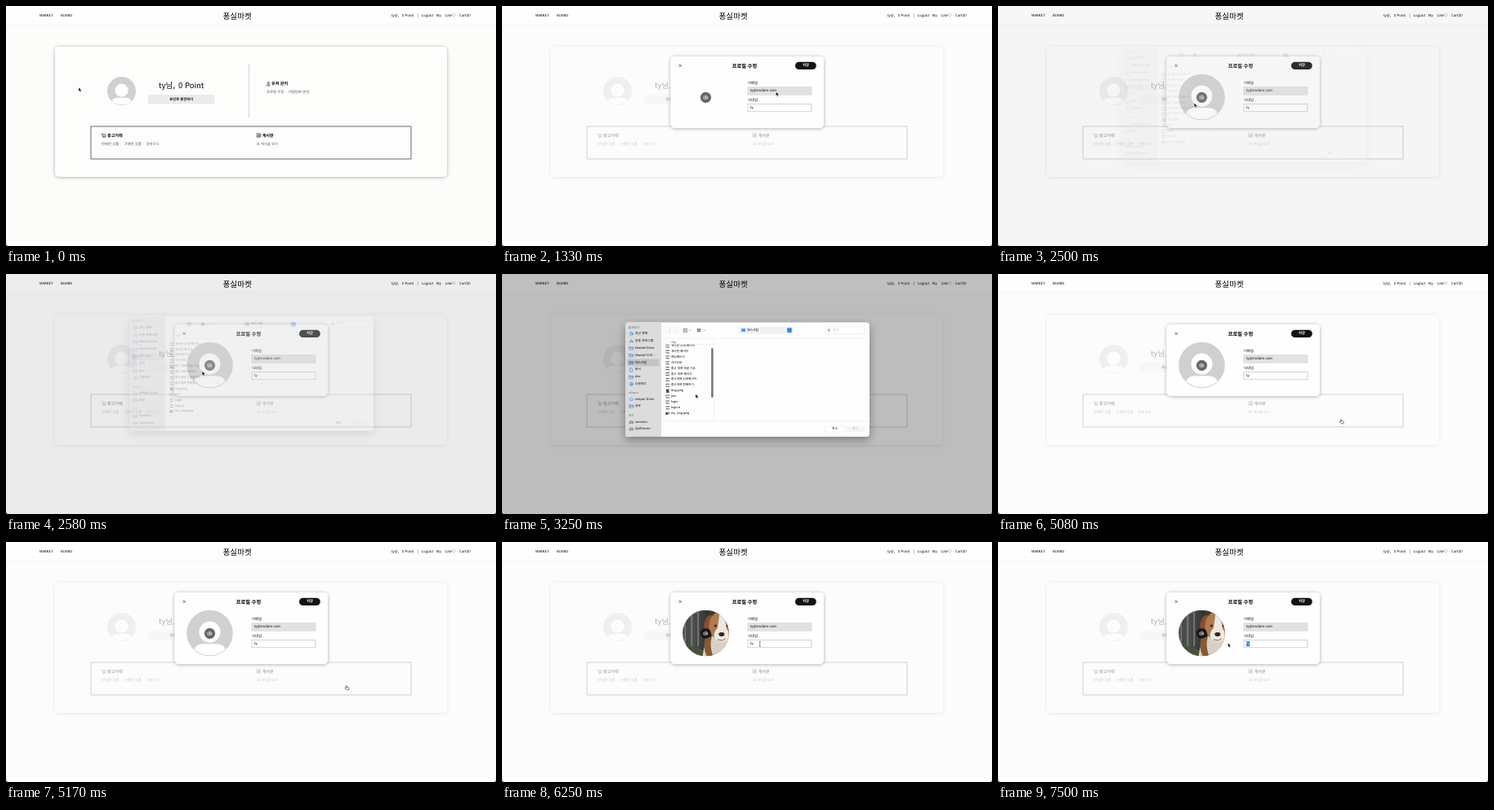
These frames come from a looping animation (600x295 px, 8 s). An HTML page:

```html
<!DOCTYPE html>
<html lang="ko">
<head>
<meta charset="utf-8">
<title>프로필 수정</title>
<style>
html, body { margin: 0; width: 100%; height: 100%; overflow: hidden; background: #fcfcfb; }
svg { display: block; width: 100%; height: 100%; }
text { font-family: 'Noto Sans CJK KR', 'Noto Sans CJK', 'Noto Sans', sans-serif; dominant-baseline: central; text-rendering: geometricPrecision; white-space: pre; }
.line { fill: none; stroke: currentColor; stroke-width: .6; stroke-linejoin: round; stroke-linecap: round; }
</style>
</head>
<body>
<svg id="stage" viewBox="0 0 600 295">
  <defs>
    <filter id="soft" x="-10%" y="-10%" width="120%" height="125%"><feDropShadow dx="0" dy=".6" stdDeviation="2.2" flood-opacity=".32"/></filter>
    <filter id="deep" x="-15%" y="-15%" width="130%" height="140%"><feDropShadow dx="0" dy="4" stdDeviation="6" flood-opacity=".35"/></filter>
    <filter id="blur"><feGaussianBlur stdDeviation=".7"/></filter>
    <linearGradient id="yard">
      <stop offset="0" stop-color="#2e302d"/><stop offset=".3" stop-color="#50524f"/>
      <stop offset=".52" stop-color="#34332f"/><stop offset="1" stop-color="#77736b"/>
    </linearGradient>
    <clipPath id="disc"><circle r="1"/></clipPath>
    <clipPath id="photoBox"><rect width="97.5" height="64.5" rx="2"/></clipPath>
    <clipPath id="round"><circle cx="249.5" cy="112" r="28.3"/></clipPath>
    <clipPath id="listBox"><rect x="195" y="86.6" width="64" height="93.5"/></clipPath>
    <clipPath id="dialogBox"><rect x="151" y="59.5" width="299" height="140.5" rx="4"/></clipPath>
    <g id="avatar">
      <circle r="1" fill="#d0d0d0"/><circle cy="-.05" r=".46" fill="#fff"/>
      <path clip-path="url(#disc)" fill="#fff" d="M-.68 .7Q-.58 .47 -.3 .47H.3Q.58 .47 .68 .7Q.4 .96 0 .96Q-.4 .96 -.68 .7Z"/>
    </g>
    <g id="photo" clip-path="url(#photoBox)">
      <rect width="98" height="65" fill="url(#yard)"/>
      <g filter="url(#blur)">
        <path d="M0 50Q20 44 44 56V65H0Z" fill="#44543a"/>
        <path d="M20 0V48M29 0V50M38 0V50" stroke="#777b7c" stroke-width="2"/>
        <path d="M84 0H98V65H88Z" fill="#948d83"/>
        <path d="M44 65Q46 44 58 36H85Q95 46 95 65Z" fill="#d8d0c6"/>
        <path d="M48 38Q44 52 50 65H59Q53 48 57 38Z" fill="#875a38"/>
        <path d="M54 7Q46 10 46 25Q49 31 55 25L62 9ZM82 6Q94 10 95 23Q91 30 86 24L78 8Z" fill="#84502e"/>
        <ellipse cx="70" cy="22" rx="17" ry="20" fill="#b37a4c"/>
        <path d="M68 2H74L77 25Q84 34 78 42Q70 47 62 41Q57 33 65 25Z" fill="#eee7df"/>
        <ellipse cx="70.5" cy="34" rx="4" ry="2.8" fill="#292422"/>
        <circle cx="62" cy="22" r="1.7" fill="#241a15"/><circle cx="79" cy="22" r="1.7" fill="#241a15"/>
        <path d="M65 41Q71 44 76 40" fill="none" stroke="#6b5148"/>
      </g>
    </g>
    <g id="clock" class="line"><circle r="2.1"/><path d="M0 -1.2V0H1"/></g>
    <g id="app" class="line"><path d="M-1.8 1.8L0 -2L1.8 1.8M-2.2 .8H2.2"/></g>
    <g id="folder" class="line"><path d="M-2.3 -1.7H-.6L0 -1.1H2.3V1.7H-2.3ZM-2.3 -.4H2.3"/></g>
    <g id="desk" class="line"><path d="M-2.3 -1.6H2.3V1.5H-2.3ZM-2.3 -.5H2.3" fill="#76aef2"/></g>
    <g id="doc" class="line"><path d="M-1.5 -2H.6L1.5 -1V2H-1.5Z"/></g>
    <g id="down" class="line"><circle r="2.1"/><path d="M0 -1.1V1M-.8 .3L0 1L.8 .3"/></g>
    <g id="cloud" class="line"><path d="M-1.5 1.3A1 1 0 0 1 -1.4 -.6A1.6 1.6 0 0 1 1.3 -.5A.9 .9 0 0 1 1.5 1.3Z"/></g>
    <g id="disk" class="line"><path d="M-2.2 .2L-1.5 -1.3H1.5L2.2 .2V1.4H-2.2ZM-2.2 .2H2.2"/></g>
    <g id="user" class="line"><circle cy="-1" r="1.1"/><path d="M-1.9 2.2Q-1.9 .7 0 .7Q1.9 .7 1.9 2.2Z"/></g>
    <g id="cart" class="line"><path d="M-2.5 -2H-1.7L-1 1H1.8L2.4 -1.2H-1.4"/><circle cx="-.7" cy="2" r=".4"/><circle cx="1.5" cy="2" r=".4"/></g>
    <g id="board" class="line"><path d="M-2 -2.2H2V2.2H-2ZM-1 -.8H1M-1 .2H1M-1 1.2H1"/></g>
    <g id="camera" class="line"><path d="M-2.2 -1.3H-1L-.6 -2H.6L1 -1.3H2.2V1.8H-2.2Z"/><circle cy=".2" r=".9"/></g>
  </defs>
  <g id="page"></g>
  <g id="modal"></g>
  <g id="sheet"><rect id="shade" width="600" height="295"/><g id="dialog"></g></g>
  <g id="cursor">
    <path id="arrow" d="M0 0V5L1.2 4L2.1 6L3 5.6L2.1 3.7H3.7Z" fill="#000" stroke="#fff" stroke-width=".4"/>
    <path id="hand" d="M.2 .4Q.8 -.3 1.2 .5V2L3.6 2.4Q4.3 2.6 4.1 3.6L3.6 5.4H1.2L-.9 3.2Q-.7 2.4 .2 3Z" fill="#fff" stroke="#222" stroke-width=".6"/>
    <path id="beam" d="M-1 -3Q0 -3 0 -2Q0 -3 1 -3M0 -2V2M-1 3Q0 3 0 2Q0 3 1 3" fill="none" stroke="#222" stroke-width=".5"/>
  </g>
</svg>
<script>
const $ = id => document.getElementById(id);
const text = (x, y, size, str, attrs = '') => `<text x="${x}" y="${y}" font-size="${size}" ${attrs}>${str}</text>`;
const rect = (x, y, w, h, fill, attrs = '') => `<rect x="${x}" y="${y}" width="${w}" height="${h}" fill="${fill}" ${attrs}/>`;
const icon = (id, x, y, color = '#222') => `<use href="#${id}" x="${x}" y="${y}" color="${color}"/>`;
const path = (d, stroke, width = .5) => `<path d="${d}" fill="none" stroke="${stroke}" stroke-width="${width}"/>`;
const bold = 'font-weight="700"', mid = 'text-anchor="middle"', end = 'text-anchor="end"';
const gray = 'fill="#555"', pale = 'fill="#888"', medium = 'font-weight="500"';

const nav = [[41, 'MARKET'], [67, 'BOARD'], [472, 'ty님,'], [485, '0 Point'], [503.5, '|'],
  [509, 'Logout'], [527, 'My'], [538, 'Like♡'], [555, 'Cart(0)']];
const links = [[319, 106, '프로필 수정'], [342.5, 106, '·'], [346, 106, '비밀번호 변경'],
  [117, 170, '판매한 상품'], [140.5, 170, '·'], [144.5, 170, '구매한 상품'], [168, 170, '·'],
  [171.5, 170, '장바구니'], [306.5, 170, '내 게시글 보기']];

$('page').innerHTML =
  rect(0, 0, 600, 295, '#fcfcfb') +
  rect(60, 50, 480, 160, '#fdfdfc', 'rx="5" filter="url(#soft)"') +
  '<use href="#avatar" transform="translate(141.5 104.5) scale(17.5)"/>' +
  text(187, 96.5, 9.5, 'ty님,', medium) + text(211, 96.5, 9.5, '0 Point', medium) +
  rect(174, 109, 81.5, 11.5, '#ebebeb', 'rx="1"') +
  text(214.7, 114.5, 4.3, '포인트 충전하기', bold + mid.padStart(21)) +
  path('M297.5 71V137', '#ccc', .8) +
  rect(104, 148, 392, 40, 'none', 'stroke="#444" stroke-width=".8"') +
  icon('user', 321.3, 95.5) + text(325, 95.5, 5.1, '유저 관리', bold) +
  icon('cart', 119.7, 159) + text(124, 159, 5.1, '중고거래', bold) +
  icon('board', 309.5, 159) + text(313.7, 159, 5.1, '게시판', bold) +
  links.map(([x, y, s]) => text(x, y, 4.35, s, gray)).join('') +
  '<rect id="veil" y="23" width="600" height="272" fill="#fdfdfc" opacity=".7"/>' +
  rect(0, 0, 600, 22.5, '#fefefe') + path('M0 22.7H600', '#f3f3f3', .6) +
  nav.map(([x, s]) => text(x, 12, 4.3, s, medium)).join('') +
  text(283.2, 11.8, 9.6, '퐁실마켓', 'font-weight="300" ' + mid) +
  '<path d="M0 293V295H2Q.4 294.6 0 293ZM600 293V295H598Q599.6 294.6 600 293Z" fill="#333"/>';

$('modal').innerHTML =
  rect(206.5, 62, 187.5, 88, '#fefefe', 'rx="5" filter="url(#soft)"') +
  path('M216.6 71.7L219.8 74.9M219.8 71.7L216.6 74.9', '#222', .6) +
  text(297, 73, 6.3, '프로필 수정', bold + ' ' + mid) +
  rect(359, 68.7, 25.8, 9.4, '#111', 'rx="4.7"') + text(372, 73.2, 4.4, '저장', bold + ' fill="#fff" ' + mid) +
  '<use id="blank" href="#avatar" transform="translate(249.5 112) scale(28.3)"/>' +
  '<g id="picked" clip-path="url(#round)"><use href="#photo" transform="translate(206.7 83.6) scale(.882)"/></g>' +
  '<circle cx="249.5" cy="112.3" r="6.6" opacity=".6"/>' + icon('camera', 249.5, 112.3, '#fff') +
  text(301, 95, 4.4, '이메일', medium) + rect(301, 99.7, 78, 9.5, '#e2e2e2', 'stroke="#ccc" stroke-width=".5"') +
  text(304, 104.4, 4.3, 'ty@nodam.com', medium) +
  text(301, 115.8, 4.4, '닉네임', medium) + rect(301, 120.5, 78, 9.3, '#fff', 'stroke="#b5b5b5" stroke-width=".6"') +
  rect(304, 122.2, 4.3, 6, '#2878d8', 'id="mark"') + text(304, 125.1, 4.3, 'ty', 'id="nick" ' + medium);

const blue = '#2c7be5';
const places = [['clock', 73.5, '최근 항목'], ['app', 82.4, '응용 프로그램'], ['folder', 91.3, 'Nimbel Drive'],
  ['folder', 100.1, 'Nimbel 드라…'], ['desk', 109, '데스크탑'], ['doc', 117.8, '문서'], ['folder', 126.6, 'dev'],
  ['down', 135.3, '다운로드'], ['cloud', 154, 'oVapor Drive'], ['folder', 162.6, '공유'],
  ['disk', 182, 'sonmiru'], ['disk', 190.5, 'Quillstone…']];
const files = ['게시판 상세 페이지', '게시판 페이지', '랜딩페이지', '사이드바', '중고 마켓 댓글 기능', '중고 마켓 페이지',
  '중고마켓 상세페이지', '중고마켓 판매하기', 'dog.jpeg', 'join', 'login', 'logout', 'my_dog.jpeg'];
const fileRow = (name, i) => {
  const y = 88.5 + i * 6.9, last = i === files.length - 1;
  const thumb = last ? `<use href="#photo" transform="translate(200.3 ${y - 1.7}) scale(.052)"/>`
    : name === 'dog.jpeg' ? rect(201, y - 2.2, 3.6, 4.5, '#54504c')
    : rect(200.6, y - 2, 4.3, 4, '#666') + rect(200.6, y - .9, 4.3, 1.8, '#f4f4f4');
  return (last ? rect(198.3, y - 3.2, 58.2, 6.6, '#0a5fd6', 'id="pick" rx="1.2"') : '') + thumb +
    text(207, y, 3.65, name, medium + (last ? ' id="pickName"' : ''));
};

$('dialog').innerHTML =
  rect(151, 59.5, 299, 140.5, '#fdfdfd', 'rx="4" filter="url(#deep)"') +
  '<g clip-path="url(#dialogBox)">' + rect(151, 59.5, 44, 141, '#dcdcdc') + '</g>' +
  rect(153.3, 104.6, 39.4, 8.7, '#c3c3c3', 'rx="1.3"') +
  [[66, '즐겨찾기'], [146.8, 'oVapor'], [174.3, '위치']].map(([y, s]) => text(155, y, 3.5, s, bold + ' ' + pale)).join('') +
  places.map(([id, y, s]) => icon(id, 158.4, y, id === 'disk' ? '#666' : blue) + text(163, y, 3.85, s, medium)).join('') +
  path('M206 67.3L204.4 69.2L206 71.1M211.8 67.3L213.4 69.2L211.8 71.1', '#bbb', .6) +
  path('M201.5 65.5H216.5V73H201.5ZM209 65.5V73', '#eee') +
  path('M222 67.2H226.6V71.2H222ZM223.5 67.2V71.2M225.1 67.2V71.2M229.3 68.6L230.3 69.8L231.3 68.6M246.3 68.6L247.3 69.8L248.3 68.6', '#555') +
  [0, 1, 2, 3].map(i => rect(239 + i % 2 * 2.2, 67.2 + (i >> 1) * 2.2, 1.7, 1.7, '#555')).join('') +
  rect(290, 64.7, 67, 8.8, '#f1f1f1', 'rx="1.8"') + rect(293, 67, 5, 4, '#4ba3f0', 'rx=".6"') +
  text(300, 69.1, 3.8, '데스크탑', medium) + rect(349.3, 66.3, 5.4, 5.6, '#1673f5', 'rx="1.3"') +
  path('M350.9 68.5L352 67.4L353.1 68.5M350.9 69.7L352 70.8L353.1 69.7', '#fff') +
  rect(396, 65, 47.5, 8.2, '#fff', 'rx="1.6" stroke="#ddd" stroke-width=".5"') +
  '<circle cx="400" cy="68.8" r="1.3" fill="none" stroke="#555" stroke-width=".5"/>' + path('M401 69.8L402 70.8', '#555') +
  text(404.8, 69.1, 3.7, '검색', 'fill="#aaa"') +
  path('M195 79H450M195 86.6H259M259.5 79V180.5M195 180.7H450', '#e4e4e4') +
  text(207, 83.2, 3.4, '오늘', gray) +
  '<g clip-path="url(#listBox)"><g id="list">' + files.map(fileRow).join('') + '</g></g>' +
  rect(256.3, 91, 2.2, 61, '#666', 'id="thumb" rx="1.1"') +
  '<g id="preview"><use href="#photo" x="306" y="82.2"/>' +
  text(267, 157.8, 4.5, 'my_dog.jpeg', bold) + text(267, 164.2, 3.65, 'JPEG 이미지 – 446KB', pale) +
  text(267, 172, 3.7, '정보', bold) + text(442, 172, 3.5, '자세히 보기', end + ' fill="#1673f5"') +
  path('M267 175.7H442', '#eee') +
  text(267, 179.2, 3.4, '생성일', pale) + text(442, 179.2, 3.5, '오늘 오후 10:18', end + ' ' + medium) + '</g>' +
  rect(395.5, 187, 24, 7.2, '#fff', 'rx="1.5" stroke="#e2e2e2" stroke-width=".5"') + text(407.5, 190.5, 3.7, '취소', medium + ' ' + mid) +
  rect(421.3, 187, 22.7, 7.2, '#f5f5f5', 'id="open" rx="1.5"') + text(432.7, 190.5, 3.7, '열기', 'id="openName" ' + medium + ' ' + mid);

// Pointer stops: step, x, y
const route = [[0, 89, 100], [0.9, 89, 100], [1, 181, 122], [3.9, 181, 122], [4, 262, 137], [7, 262, 137],
  [13, 335.5, 105.5], [19, 335.5, 105.5], [24, 246, 113], [29, 246, 113], [30, 240.3, 119.3], [36, 240, 120],
  [39, 237, 147.5], [42, 237, 150], [46, 225, 170], [48, 225, 170], [53, 431.5, 183.5], [57, 432, 187],
  [62, 416, 176.5], [66, 350, 132], [68, 281.5, 121], [70, 281.5, 121], [74, 320, 125], [78, 303, 126],
  [80, 297, 127], [81, 281.5, 124]];
const along = n => {
  const i = route.findIndex(stop => stop[0] > n);
  if (i < 0) return route.at(-1).slice(1);
  const [a, x, y] = route[i - 1], [b, u, v] = route[i], k = (n - a) / (b - a);
  return [x + (u - x) * k, y + (v - y) * k];
};
const clamp = v => Math.max(0, Math.min(1, v));
const show = (id, on) => $(id).setAttribute('visibility', on ? 'inherit' : 'hidden');
const fill = (id, color) => $(id).setAttribute('fill', color);

function draw(now) {
  const n = Math.floor((now % 8000 + 3.5) * 12 / 1000); // twelve steps a second
  const open = n >= 16, chosen = n >= 47, uploaded = n >= 71, marked = n >= 77;
  show('veil', open);
  show('modal', open);
  show('blank', n >= 17 && !uploaded && open);
  show('picked', uploaded);
  show('mark', marked);
  fill('nick', marked ? '#fff' : '#000');

  const rise = clamp((n - 29) / 6) ** 1.2;
  const fade = n < 57 ? rise : clamp(1 - (n - 56) / 5);
  show('sheet', fade > 0);
  $('shade').setAttribute('opacity', .25 * fade);
  $('dialog').setAttribute('opacity', fade);
  $('dialog').setAttribute('transform', `translate(0 ${-10 * (1 - rise)})`);
  $('list').setAttribute('transform', `translate(0 ${5 * clamp((39 - n) / 3)})`);
  show('thumb', n >= 37 && n < 45);
  show('pick', chosen);
  show('preview', chosen);
  fill('pickName', chosen ? '#fff' : '#000');
  fill('open', chosen ? '#0b6df6' : '#f5f5f5');
  fill('openName', chosen ? '#fff' : '#bbb');

  const hand = n >= 22 && n < 30 || n >= 59 && n < 64, beam = n >= 73 && n < 80;
  show('hand', hand);
  show('beam', beam);
  show('arrow', !hand && !beam);
  $('cursor').setAttribute('transform', `translate(${along(n)})`);
}
const start = performance.now();
const tick = () => { draw(performance.now() - start); requestAnimationFrame(tick); };
tick();
</script>
</body>
</html>
```
